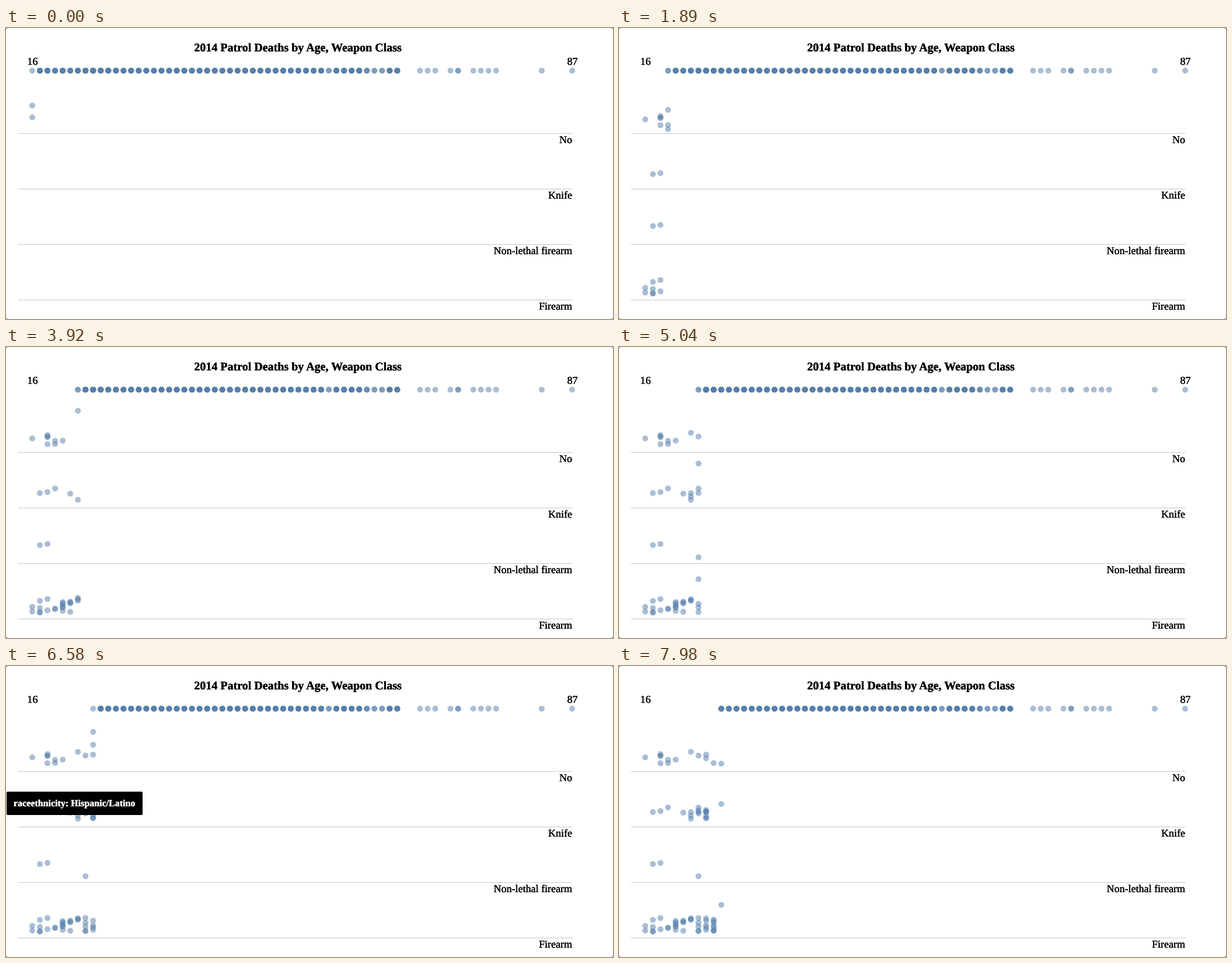
These frames come from a looping animation (1040x498 px, 8 s). A matplotlib script:

```python
import numpy as np
import matplotlib.pyplot as plt
from matplotlib.animation import FuncAnimation
from matplotlib.collections import EllipseCollection
from matplotlib.patches import FancyBboxPatch, Polygon
from matplotlib.patheffects import withStroke

plt.rcParams["text.hinting"] = "none"

W, H, DPI = 1040, 498, 64
PX = 72 / DPI  # points per pixel
LOOP, INTERVAL, TICK = 8000, 40, 70

LEFT, RIGHT, TOP = 45, 970, 73
FIRST_AGE, LAST_AGE = 16, 87
DOT = "#557fab"

ROWS = {"N": "No", "K": "Knife", "L": "Non-lethal firearm", "F": "Firearm"}
ROW_TOP, ROW_GAP = 180, 95

# Row each dot falls to, in order of departure; one word per age from 16
FALLS = ("NFF FKFLFF NFKNNLFN NNFKF FNFFFFF KFFFF KFFFNKK "
         "FNKFLKFFFKK NFKKFKFKKFKNKF FNFFFFFFF NFF").split()

# Dots that stay in the top row: a pile per age, thinner where listed
PILE = 6
THIN = {55: 2, 60: 3, 61: 2, 62: 2}
OLDEST = [67, 68, 69, 71, 72, 72, 74, 75, 76, 77, 83, 87]

PACE = 104.4   # ms between departures
AHEAD = 2.43   # departures before the loop begins
FALL = 2       # length of a fall, in departures
TIP_SHOWN = (6300, 7300)


def age_x(age):
    span = LAST_AGE - FIRST_AGE
    return LEFT + (np.asarray(age) - FIRST_AGE) * (RIGHT - LEFT) / span


def label(x, y, text, px, ha="center", color="black", **kw):
    return ax.text(x, y, text, fontsize=px * PX, ha=ha, va="baseline",
                   family="Liberation Serif", color=color,
                   path_effects=[withStroke(linewidth=0.3 * PX,
                                            foreground=color)], **kw)


fig = plt.figure(figsize=(W / DPI, H / DPI), dpi=DPI, facecolor="white")
ax = fig.add_axes([0, 0, 1, 1])
ax.set_xlim(0, W)
ax.set_ylim(H, 0)
ax.axis("off")

for x, dx in ((0, 3), (W, -3)):
    for y, dy in ((0, 3), (H, -3)):
        ax.add_patch(Polygon([(x, y), (x + dx, y), (x, y + dy)],
                             fc="#b0b0b0", lw=0))

label(500, 40, "2014 Patrol Deaths by Age, Weapon Class", 20, weight="bold")
label(45.5, 63, FIRST_AGE, 18)
label(970.5, 63, LAST_AGE, 18)

row_y = {}
for i, (key, name) in enumerate(ROWS.items()):
    y = row_y[key] = ROW_TOP + ROW_GAP * i
    ax.plot([20, RIGHT], [y, y], color="#c6c6c6", lw=PX, zorder=1,
            solid_capstyle="butt")
    label(RIGHT, y + 17, name, 18, ha="right")

# Falling dots come to rest at a random height just above their row's line
rng = np.random.default_rng(16)
fall_age = [FIRST_AGE + i for i, word in enumerate(FALLS) for _ in word]
lines = np.array([row_y[key] for word in FALLS for key in word])
fall_y = lines - rng.uniform(10, 34, len(lines))
order = np.arange(1, len(lines) + 1)

rest_age = [a for a in range(26, 65) for _ in range(THIN.get(a, PILE))]
xs = age_x(fall_age + rest_age + OLDEST)
ys = np.full(len(xs), float(TOP))
size = np.full(len(xs), 10.0)
dots = EllipseCollection(size, size, 0 * size, units="x",
                         offsets=np.c_[xs, ys], offset_transform=ax.transData,
                         facecolors=DOT, alpha=0.5, linewidths=0, zorder=2)
ax.add_collection(dots)

tip = [
    ax.add_patch(FancyBboxPatch((1, 215), 233, 40, fc="black", lw=0, zorder=4,
                                boxstyle="round,pad=0,rounding_size=2")),
    label(13, 240, "raceethnicity: Hispanic/Latino", 16, ha="left",
          color="white", weight="bold", zorder=5),
]


def draw(i):
    t = TICK * round(i * INTERVAL / TICK)
    p = np.clip((AHEAD + t / PACE - order) / FALL, 0, 1)
    ys[:len(p)] = TOP + (fall_y - TOP) * p
    dots.set_offsets(np.c_[xs, ys])
    for part in tip:
        part.set_visible(TIP_SHOWN[0] <= t < TIP_SHOWN[1])
    return [dots, *tip]


anim = FuncAnimation(fig, draw, frames=LOOP // INTERVAL, interval=INTERVAL,
                     repeat=True, repeat_delay=0, blit=False)
plt.show()
```
